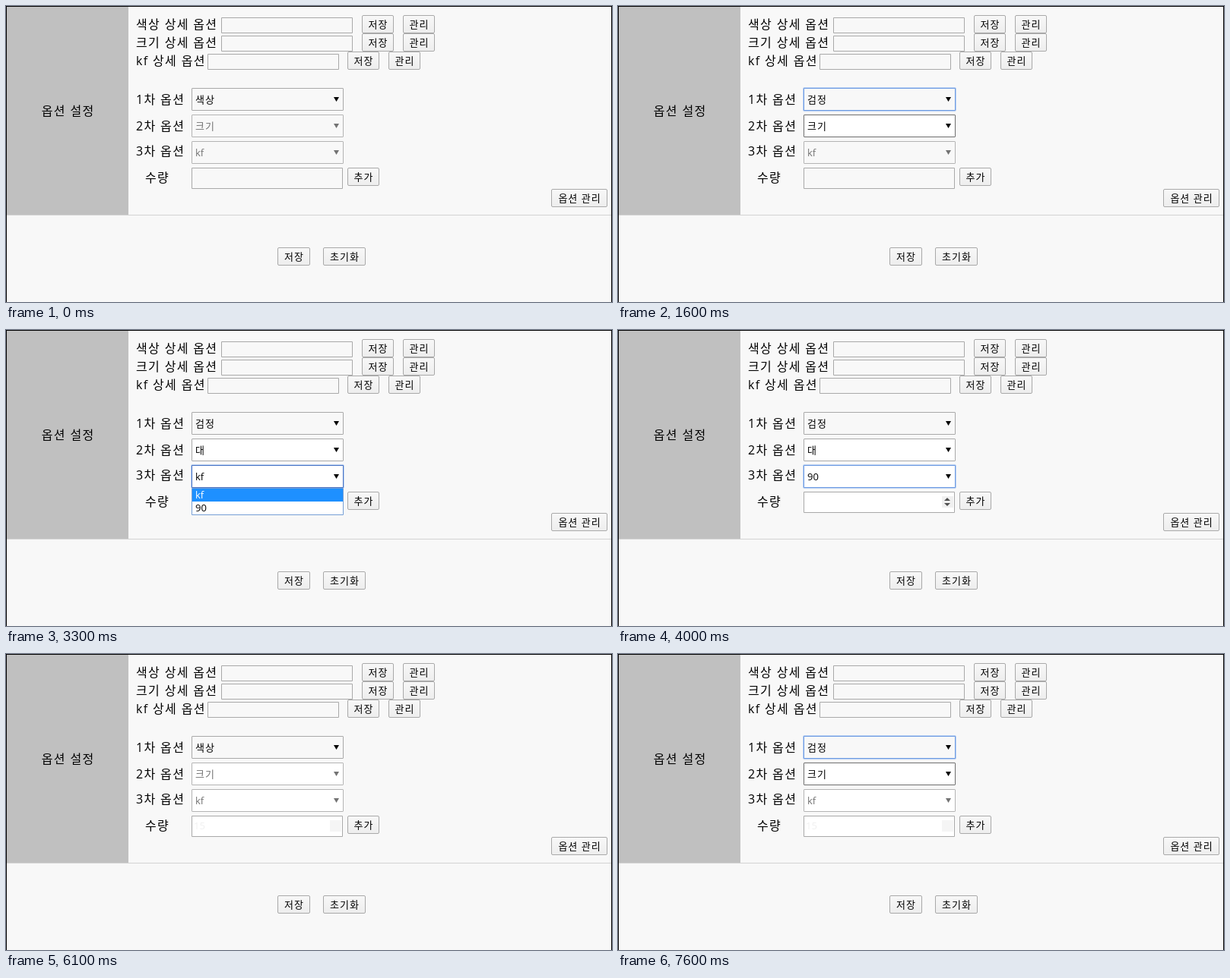
Write an HTML page with a canvas that moves like this. It is 797x390 px and loops after 8 s.

```html
<!DOCTYPE html>
<html lang="ko">
<head>
<meta charset="utf-8">
<title>옵션 설정</title>
<style>
  html, body { margin: 0; width: 100%; height: 100%; overflow: hidden; background: #f8f8f8; }
  canvas { display: block; }
</style>
</head>
<body>
<canvas id="stage" width="797" height="390"></canvas>
<script>
const ctx = document.getElementById('stage').getContext('2d');
const LOOP = 8000;
const PAGE = '#f8f8f8', BORDER = '#a9a9a9', DARK = '#6e6e6e', BLUE = '#1e90ff';
const FONT = '"Open Sans", "Noto Sans CJK KR", "Noto Sans CJK JP", "Noto Sans CJK", sans-serif';

const selects = [
  { y: 108, row: 18, options: ['색상', '검정', '빨강'] },
  { y: 143, row: 18, options: ['크기', '대', '중', '소'] },
  { y: 178, row: 17, options: ['kf', '90'] }
];

// "on" counts the enabled fields, "lit" those that have turned white.
const start = {
  picks: [0, 0, 0], on: 1, lit: 1, hover: '', focus: -1, open: -1, hot: 0,
  amount: '', ghost: false, caret: false, spin: false, pressed: false
};

const timeline = [
  [600, { hover: 0 }],
  [800, { focus: 0 }],
  [900, { open: 0, hot: 0 }],
  [1200, { hot: 1 }],
  [1600, { open: -1, picks: [1, 0, 0], on: 2, lit: 2, hover: 1 }],
  [2100, { focus: 1 }],
  [2200, { open: 1, hot: 0 }],
  [2500, { hot: 1 }],
  [2800, { open: -1, picks: [1, 1, 0], on: 3, lit: 3, hover: 2 }],
  [3200, { focus: 2 }],
  [3300, { open: 2, hot: 0 }],
  [3600, { hot: 1 }],
  [3900, { open: -1, picks: [1, 1, 1], on: 4, lit: 4, hover: '' }],
  [4000, { spin: true }],
  [4200, { focus: 3, caret: true }],
  [4700, { caret: false }],
  [4800, { amount: '1', caret: true }],
  [5100, { amount: '15' }],
  [5400, { hover: 'add' }],
  [5600, { focus: -1, caret: false, spin: false, pressed: true }],
  [5700, { picks: [0, 0, 0], on: 1, amount: '', ghost: true }],
  [5800, { pressed: false }],
  [6100, { hover: '' }],
  [6300, { hover: 0 }],
  [6600, { focus: 0 }],
  [6700, { open: 0, hot: 0 }],
  [7200, { hot: 1 }],
  [7600, { open: -1, picks: [1, 0, 0], on: 2, hover: 1 }]
];

function stateAt(time) {
  const past = timeline.filter(([at]) => at <= time).map(([, patch]) => patch);
  return Object.assign({}, start, ...past);
}

function fill(x, y, w, h, color) {
  ctx.fillStyle = color;
  ctx.fillRect(x, y, w, h);
}

function frame(x, y, w, h, color, radius = 0) {
  ctx.strokeStyle = color;
  ctx.lineWidth = 1;
  ctx.beginPath();
  ctx.roundRect(x + 0.5, y + 0.5, w - 1, h - 1, radius);
  ctx.stroke();
}

function text(str, x, middle, size = 13, color = '#000', align = 'left') {
  const gap = /[가-힣]/.test(str) ? (size > 13 ? 1.35 : 1) : 0;
  ctx.font = `${size}px ${FONT}`;
  ctx.letterSpacing = gap + 'px';
  ctx.textAlign = 'left';
  ctx.fillStyle = color;
  const left = align === 'center' ? x - (ctx.measureText(str).width - gap) / 2 : x;
  ctx.fillText(str, left, middle + Math.round(size * 0.36));
}

function triangle(x, y, w, h, color) {
  ctx.fillStyle = color;
  ctx.beginPath();
  ctx.moveTo(x, y);
  ctx.lineTo(x + w, y);
  ctx.lineTo(x + w / 2, y + h);
  ctx.fill();
}

function ring(x, y, w, h, hovered) {
  frame(x - 1, y - 1, w + 2, h + 2, '#b9d0f3', 1.5);
  frame(x, y, w, h, hovered ? '#4a74c4' : '#6f9ce2');
}

function button(label, x, y, w, hovered, pressed) {
  const shade = ctx.createLinearGradient(0, y, 0, y + 24);
  shade.addColorStop(0, pressed ? '#e4e4e4' : '#f8f8f8');
  shade.addColorStop(1, pressed ? '#f4f4f4' : '#ededed');
  fill(x + 1, y + 1, w - 2, 22, shade);
  frame(x, y, w, 24, hovered ? DARK : BORDER, 1.5);
  text(label, x + w / 2, y + 12, 13, '#000', 'center');
}

function detailRow(label, inputX, y) {
  text(label, 171, y + 12, 16);
  frame(inputX, y + 3, 173, 21, BORDER);
  const right = inputX === 283 ? 468 : 449;
  button('저장', right, y, 42);
  button('관리', right + 54, y, 42);
}

function drawSelect(i, s) {
  const { y, options } = selects[i];
  const enabled = i < s.on, hovered = s.hover === i;
  const ink = enabled ? '#000' : '#737373';
  fill(244, y, 200, 30, i > 0 && i < s.lit ? '#fff' : PAGE);
  frame(244, y, 200, 30, hovered ? DARK : enabled ? BORDER : '#b4b4b4', 0.5);
  text(options[s.picks[i]], 249, y + 15, 13, ink);
  triangle(431, y + 12, 7, 6, ink);
  if (s.focus === i) ring(244, y, 200, 30, hovered);
}

function drawList(i, hot) {
  const { y, row, options } = selects[i];
  const top = y + 30;
  fill(244, top, 200, options.length * row + 2, '#fff');
  options.forEach((option, n) => {
    const rowY = top + 1 + n * row;
    if (n === hot) fill(245, rowY, 198, row, BLUE);
    text(option, 249, rowY + Math.floor(row / 2), 13, n === hot ? '#fff' : '#000');
  });
  frame(244, top, 200, options.length * row + 2, '#759fd6');
}

function drawAmount(s) {
  fill(244, 213, 199, 28, s.lit > 3 ? '#fff' : PAGE);
  frame(244, 213, 199, 28, BORDER);
  if (s.ghost) {
    text('15', 247, 226, 13, '#f0f0f0');
    fill(426, 219, 15, 15, '#f5f5f5');
  }
  text(s.amount, 247, 226);
  if (s.caret) fill(247 + Math.round(ctx.measureText(s.amount).width), 219, 1, 15, '#000');
  if (s.spin) {
    fill(426, 219, 15, 15, '#f0f0f0');
    triangle(429, 225, 8, -4, '#505050');
    triangle(429, 228, 8, 4, '#505050');
  }
  if (s.focus === 3) ring(244, 213, 199, 28, false);
}

function draw(s) {
  fill(0, 0, 797, 390, PAGE);
  fill(1, 1, 160, 274, '#c0c0c0');
  fill(0, 275, 797, 1, '#d3d3d3');
  fill(0, 0, 797, 1, '#000');
  fill(0, 0, 1, 390, '#000');
  fill(796, 0, 1, 390, '#000');

  text('옵션 설정', 81, 138, 16, '#000', 'center');
  detailRow('색상 상세 옵션', 283, 12);
  detailRow('크기 상세 옵션', 283, 36);
  detailRow('kf 상세 옵션', 265, 60);
  [123, 158, 191].forEach((y, i) => text(`${i + 1}차 옵션`, 171, y, 16));
  text('수량', 183, 226, 16);

  selects.forEach((_, i) => drawSelect(i, s));
  drawAmount(s);
  button('추가', 449, 213, 42, s.hover === 'add', s.pressed);
  button('옵션 관리', 717, 241, 74);
  button('저장', 357, 318, 43);
  button('초기화', 417, 318, 56);
  if (s.open >= 0) drawList(s.open, s.hot);
}

let began;
function tick(now) {
  began ??= now;
  draw(stateAt((now - began) % LOOP));
  requestAnimationFrame(tick);
}
requestAnimationFrame(tick);
</script>
</body>
</html>
```
